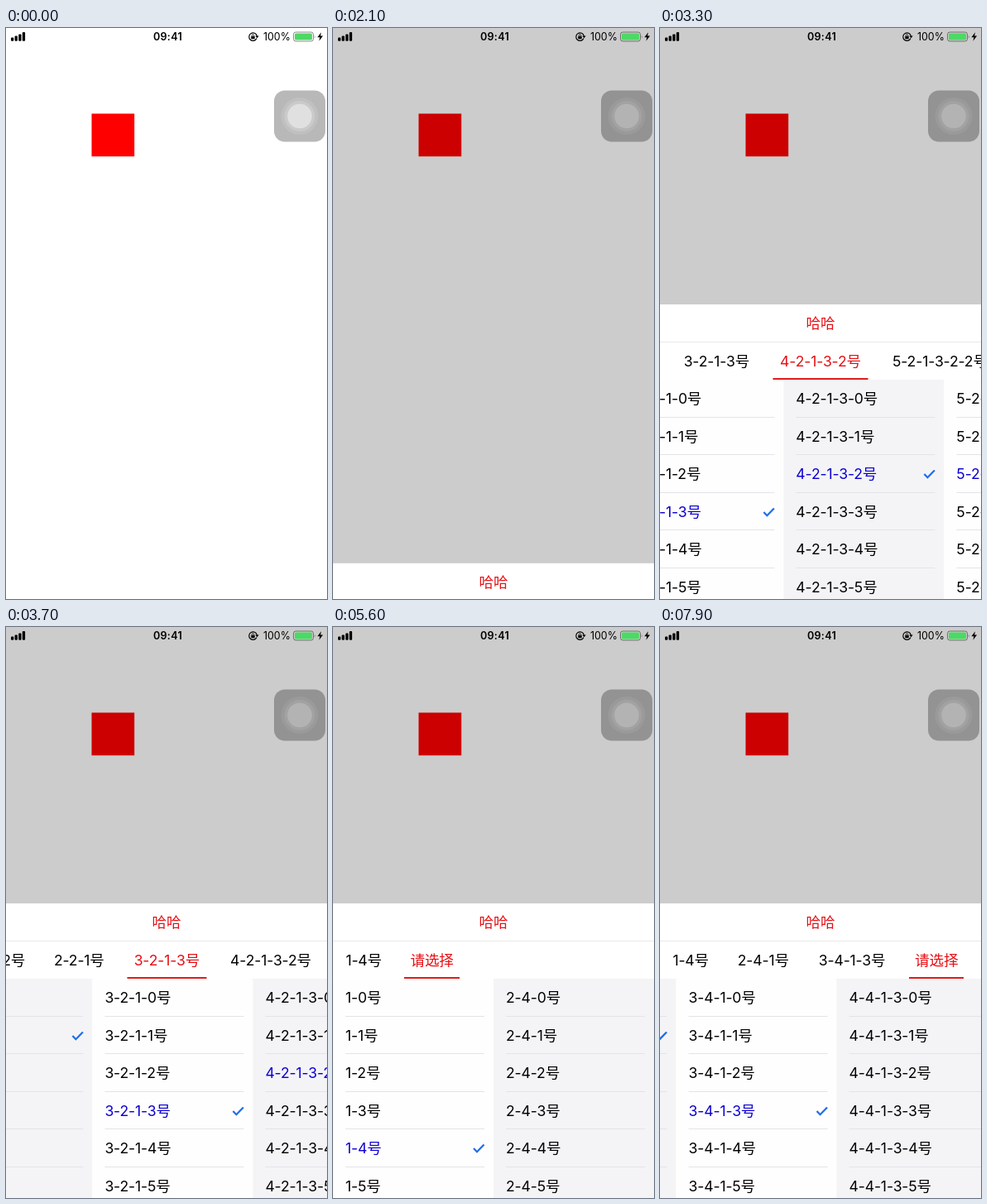
These frames come from a looping animation (388 px wide and 690 px high, 8000 ms). An HTML page:

```html
<!DOCTYPE html>
<html lang="zh-CN">
<head>
<meta charset="utf-8">
<title>Picker sheet</title>
<style>
html, body { margin: 0; width: 100%; height: 100%; overflow: hidden; background: #fff; }
#stage {
  position: relative; width: 388px; height: 690px; overflow: hidden; background: #fff;
  font: 17.6px/45.5px Inter, "Noto Sans CJK SC", "Noto Sans CJK", sans-serif;
  letter-spacing: -.15px; color: #000; white-space: nowrap;
}
#stage > * { position: absolute; }
#dim { inset: 0; background: #000; opacity: 0; }
svg { display: block; }
#sheet { left: 0; top: 334px; width: 388px; height: 356px; background: #fff; overflow: hidden; }
#title { height: 45.5px; text-align: center; color: #e60f14; }
.panel { position: absolute; top: 45px; left: 0; width: 388px; height: 311px; overflow: hidden; visibility: hidden; }
.panel.on { visibility: visible; }
.strip { height: 45px; border: solid #e9e9eb; border-width: 1px 0; box-sizing: content-box; width: 388px; }
.tabs { position: absolute; left: 0; top: 1px; display: flex; gap: 20.6px; padding: 0 10px 0 8.6px; }
.tab { position: relative; height: 44.5px; }
.tab.on { color: #e60f14; }
.tab.on::after { content: ""; position: absolute; left: 0; right: 0; bottom: 0; height: 2px; background: #e21b1b; }
.cols { position: absolute; left: 0; top: 46px; display: flex; }
.col { position: relative; width: 194px; height: 320px; background: #fefefe; }
.col:nth-child(even) { background: #f4f4f7; }
.row { position: relative; height: 45.5px; padding-left: 15px; }
.row::after { content: ""; position: absolute; left: 15px; width: 168px; bottom: 0; height: 1px; background: #e4e4e8; }
.row.on { color: #0d00d0; }
.row svg { position: absolute; left: 168px; top: 16px; }
</style>
</head>
<body>
<div id="stage">
  <svg width="388" height="160">
    <rect x="103.500" y="103.500" width="51.700" height="51.700" fill="#f00"/>
    <rect x="324" y="75.500" width="62" height="62" rx="13" fill="#b8b8b8"/>
    <circle cx="355" cy="106.500" r="22.500" fill="#c0c0c0"/>
    <circle cx="355" cy="106.500" r="18.500" fill="#cacaca"/>
    <circle cx="355" cy="106.500" r="14.800" fill="#e0e0e0"/>
  </svg>
  <div id="dim"></div>
  <svg width="388" height="22" font-family="Inter, sans-serif" letter-spacing="0">
    <rect x="6" y="11.500" width="3.300" height="4.200" rx="1"/>
    <rect x="10.600" y="9.500" width="3.300" height="6.200" rx="1"/>
    <rect x="15.200" y="7.500" width="3.300" height="8.200" rx="1"/>
    <rect x="19.800" y="5" width="3.300" height="10.700" rx="1"/>
    <text x="195.500" y="15" font-size="12.600" font-weight="600" text-anchor="middle" letter-spacing=".3">09:41</text>
    <path d="M303 12.500A4.800 4.800 0 1 1 303.300 9.800" fill="none" stroke="#000" stroke-width="1.200"/>
    <path d="M301.300 9.500h4.400l-2.200 2.800z"/>
    <rect x="296.300" y="10" width="4.400" height="3.200" rx=".5"/>
    <path d="M297.300 10V9a1.200 1.200 0 0 1 2.400 0v1" fill="none" stroke="#000" stroke-width=".8"/>
    <text x="311" y="15" font-size="12.400">100%</text>
    <rect x="347.500" y="5" width="24" height="11" rx="2.800" fill="none" stroke="#000" stroke-opacity=".45"/>
    <rect x="349" y="6.500" width="21" height="8" rx="1.500" fill="#4cd964"/>
    <path d="M372.800 8.500q1.500 2 0 4z" opacity=".45"/>
    <path d="M381 5.200l-4.600 6h3l-1 4.600 4.700-6.200h-3z"/>
  </svg>
  <div id="sheet"><div id="title">哈哈</div></div>
</div>
<script>
const COL = 194, LOOP = 8000;
const $ = id => document.getElementById(id);
const clamp = (v, lo, hi) => Math.min(hi, Math.max(lo, v));
const ramp = (t, start, len) => {
  const p = clamp((t - start) / len, 0, 1);
  return p * p * (3 - 2 * p);
};
const tick = '<svg width="17" height="14"><path d="M2 7l4 4.200 8.500-8.700" fill="none" stroke="#1f6fe8" stroke-width="2.300"/></svg>';

// The deepest level repeats the row number instead of the previous pick.
function label(picks, level, i) {
  const path = picks.slice(0, level);
  if (level === 4) path[3] = i;
  return [level + 1, ...path, i].join('-') + '号';
}

function makePanel(start, picks, count) {
  const el = document.createElement('div');
  const levels = [...Array(count).keys()];
  const tabs = levels.map(n => `<div class="tab">${n < picks.length ? label(picks, n, picks[n]) : '请选择'}</div>`);
  const cols = levels.map(n => '<div class="col">' + [...Array(7).keys()].map(i =>
    i === picks[n]
      ? `<div class="row on">${label(picks, n, i)}${tick}</div>`
      : `<div class="row">${label(picks, n, i)}</div>`).join('') + '</div>');
  el.className = 'panel';
  el.innerHTML = `<div class="strip"></div><div class="tabs">${tabs.join('')}</div><div class="cols">${cols.join('')}</div>`;
  $('sheet').append(el);
  const tabEls = [...el.querySelectorAll('.tab')];
  // Side padding grows slightly with the label.
  for (const tab of tabEls) tab.style.padding = `0 ${5.5 + .03 * tab.offsetWidth}px`;
  return { start, el, strip: el.querySelector('.tabs'), cols: el.querySelector('.cols'), tabs: tabEls };
}

const panels = [
  makePanel(0, [2, 1, 3, 2, 2], 5),
  makePanel(5400, [4], 2),
  makePanel(7061, [4, 1], 3),
  makePanel(7660, [4, 1, 3], 4)
];

const drag = [[2900, 582], [3700, 284], [4300, 44], [4450, 0]];
function dragAt(t) {
  if (t <= drag[0][0]) return drag[0][1];
  for (let i = 1; i < drag.length; i++) {
    const [t0, a] = drag[i - 1], [t1, b] = drag[i];
    if (t < t1) return a + (b - a) * (t - t0) / (t1 - t0);
  }
  return 0;
}

const offsetAt = t => t < 5400 ? dragAt(t) : COL * (ramp(t, 7061, 300) + ramp(t, 7660, 300));

// Times at which the dragged list hands over to the next lower tab.
const handover = [2910, 3421, 3925, 4450];

function stripTarget(panel, index) {
  const tab = panel.tabs[index];
  const max = Math.max(0, panel.strip.offsetWidth - 388);
  return clamp(tab.offsetLeft + tab.offsetWidth / 2 - COL, 0, max);
}

function render(t) {
  $('dim').style.opacity = .2 * ramp(t, 1750, 300);
  $('sheet').style.transform = `translateY(${356 * (1 - ramp(t, 2014, 400))}px)`;

  const panel = panels.filter(p => t >= p.start).pop();
  panels.forEach(p => p.el.classList.toggle('on', p === panel));
  panel.cols.style.transform = `translateX(${-offsetAt(t)}px)`;

  const last = panel.tabs.length - 1;
  let index = last, x = stripTarget(panel, last);
  if (panel === panels[0]) {
    for (const at of handover) {
      if (t < at) break;
      index--;
      x += (stripTarget(panel, index) - x) * ramp(t, at, 250);
    }
  }
  panel.tabs.forEach((tab, i) => tab.classList.toggle('on', i === index));
  panel.strip.style.transform = `translateX(${-x}px)`;
}

const begin = performance.now();
function loop() {
  render((performance.now() - begin) % LOOP);
  requestAnimationFrame(loop);
}
loop();
</script>
</body>
</html>
```
